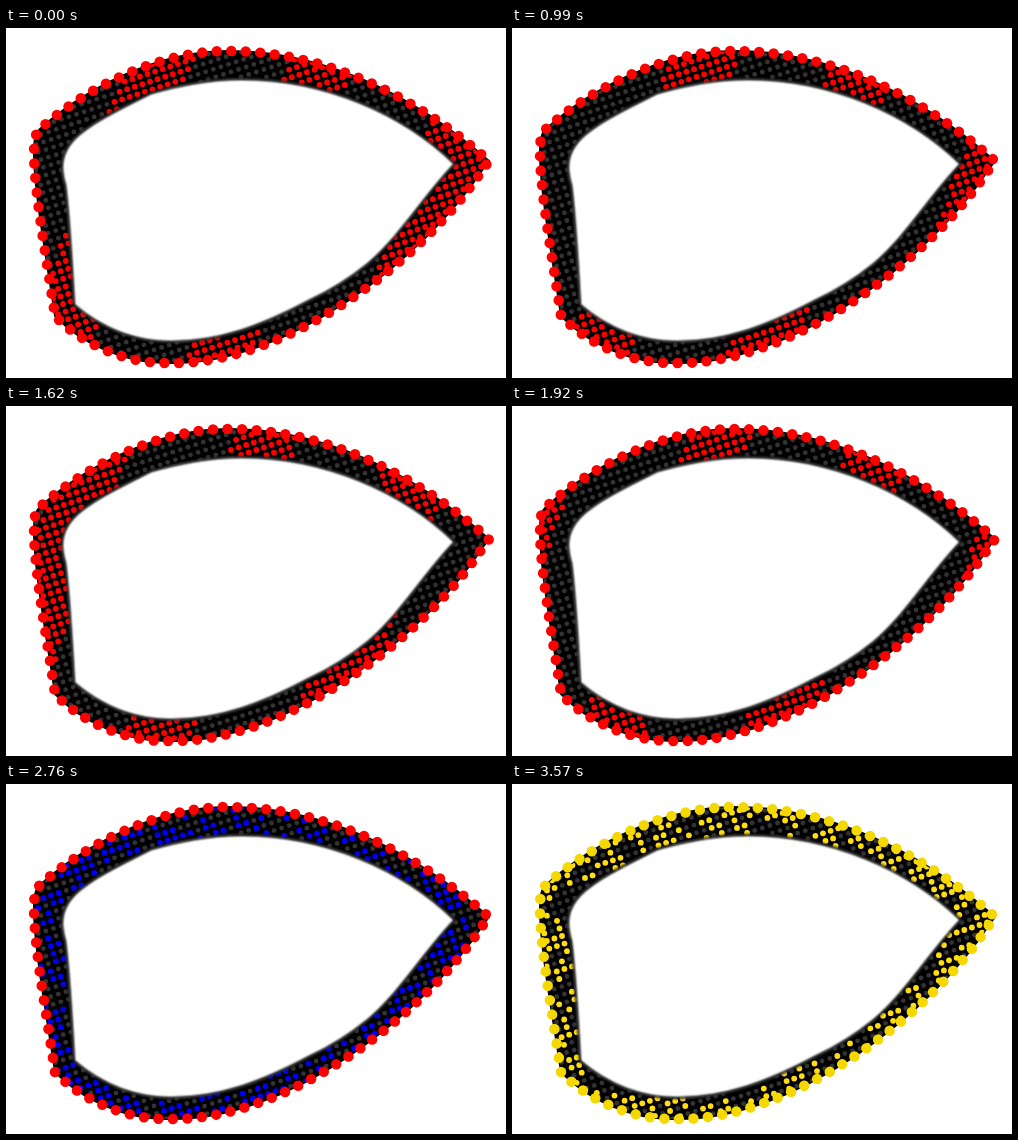
Animation of 500x350 px, one loop 3.6 s. Source, as an HTML page with a canvas:

```html
<!DOCTYPE html>
<html>
<head>
<meta charset="utf-8">
<style>
html, body { margin: 0; overflow: hidden; background: #fff; }
canvas { display: block; }
</style>
</head>
<body>
<canvas width="500" height="350"></canvas>
<script>
const ctx = document.querySelector('canvas').getContext('2d');

const rimShape = 'M49 288C43 245 28 165 28 125C28 112 29 105 35 100C78 62 150 23 222 23' +
  'C315 23 405 64 483 133L477 141C420 228 282 339 160 335C120 335 77 317 49 288Z';
const holeShape = 'M449 136C397 85 318 51 236 51C200 51 172 58 145 65C115 80 84 95 68 111' +
  'C54 126 54 140 59 157C62 180 66 240 68 277C95 300 128 314 165 314C215 314 258 297 303 273' +
  'Q335 258 362 236C395 208 418 168 449 136Z';
const rim = new Path2D(rimShape), hole = new Path2D(holeShape);

const ruler = document.createElementNS('http://www.w3.org/2000/svg', 'path');
ruler.setAttribute('d', rimShape);
const bulbGap = ruler.getTotalLength() / 83;

// Tilted lattice of small lamps, kept where the band is
const lamps = [];
for (let i = -20; i < 80; i++) {
  for (let j = -5; j < 70; j++) {
    const x = 7.6 * i + 2.5 * j, y = 7.6 * j - 2.5 * i;
    if (ctx.isPointInPath(rim, x, y) && !ctx.isPointInPath(hole, x, y)) lamps.push({ x, y, i, j });
  }
}

const mod = (a, n) => ((a % n) + n) % n;
const noise = (a, b, c) => mod(Math.sin(a * 12.99 + b * 78.23 + c * 37.72) * 43758.5, 1);

function dot(x, y, r, color) {
  ctx.fillStyle = color;
  ctx.beginPath();
  ctx.arc(x, y, r, 0, 7);
  ctx.fill();
}

function draw(step) {
  const sweeping = step < 72, yellow = step >= 109;
  const lampColor = sweeping ? '#f00' : yellow ? '#fd1' : '#00e';
  const isLit = ({ x, y, i, j }) => sweeping
    ? mod(x + 0.36 * y - 133 - 11 * step, 163) < 66
    : noise(i, j, step) < 0.5;

  ctx.clearRect(0, 0, 500, 350);
  ctx.save();
  ctx.fillStyle = ctx.strokeStyle = '#000';
  ctx.lineWidth = 2;
  ctx.fill(rim);
  ctx.stroke(rim);
  ctx.clip(rim);
  for (const lamp of lamps) {
    if (isLit(lamp)) dot(lamp.x, lamp.y, 2.9, lampColor);
    else dot(lamp.x, lamp.y, 2.4, '#333');
  }
  // Soft dark lip around the opening
  ctx.filter = 'blur(1px)';
  ctx.fillStyle = '#fff';
  ctx.fill(hole);
  ctx.stroke(hole);
  ctx.restore();

  // Round caps on zero-length dashes make the outer bulbs
  ctx.lineWidth = 10.5;
  ctx.lineCap = 'round';
  ctx.strokeStyle = yellow ? '#f5d800' : '#f00';
  ctx.setLineDash([0, bulbGap]);
  ctx.lineDashOffset = sweeping ? -8.5 - 1.545 * step : 0;
  ctx.stroke(rim);
  ctx.setLineDash([]);
}

function tick() {
  draw(Math.floor(performance.now() / 30) % 120);
  requestAnimationFrame(tick);
}
tick();
</script>
</body>
</html>
```
